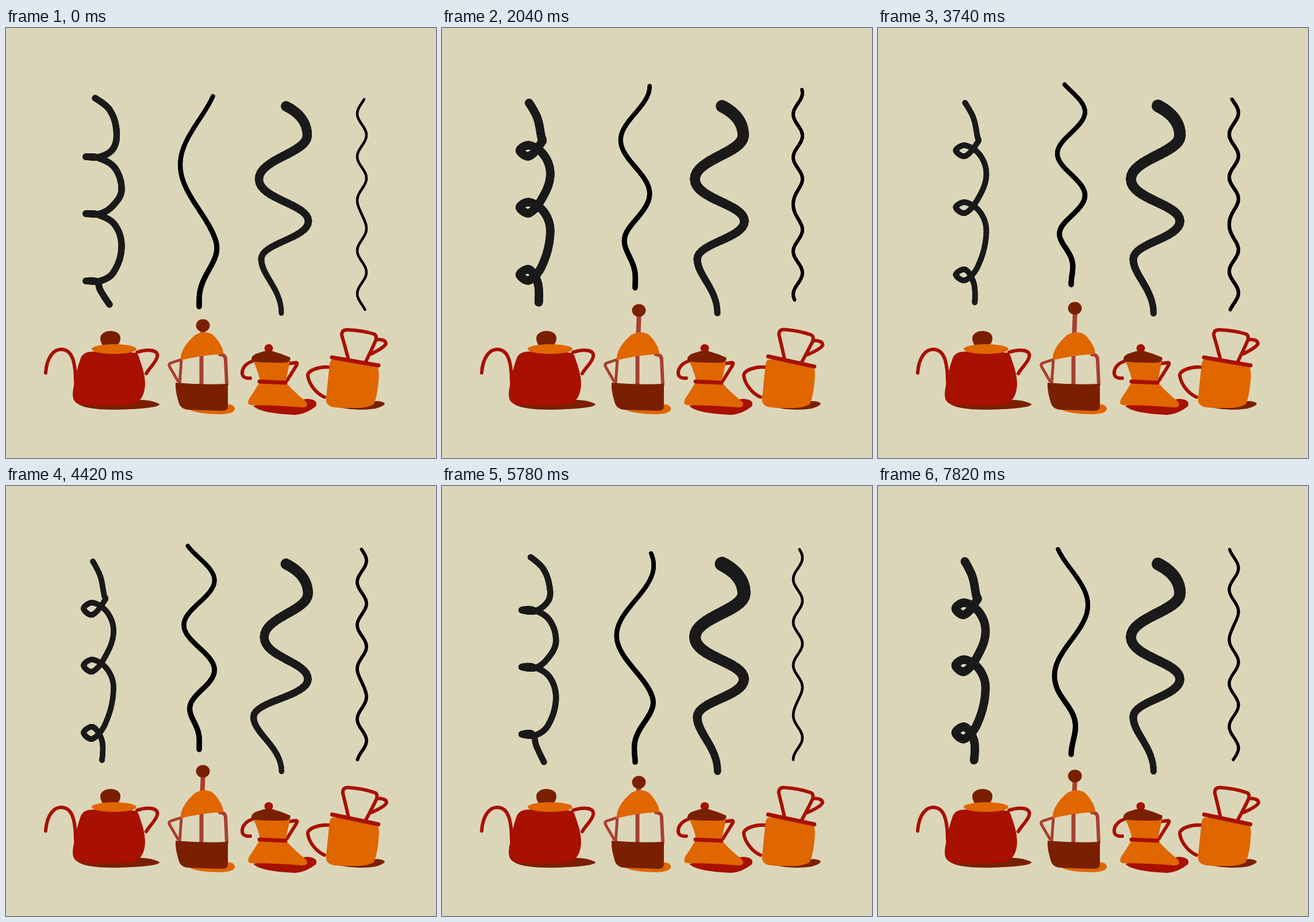
Recreate the animation shown at these times as an HTML page with a canvas. Size 748 px wide and 748 px high, loop 7990 ms.

```html
<!DOCTYPE html>
<html lang="en">
<head>
<meta charset="utf-8">
<title>Steam over coffee pots</title>
<style>
  html, body { margin: 0; width: 100%; height: 100%; overflow: hidden; background: #dcd6b9; }
  canvas { display: block; width: 100vmin; height: 100vmin; }
</style>
</head>
<body>
<canvas width="748" height="748"></canvas>
<script>
const ctx = document.querySelector('canvas').getContext('2d');
const STEP = 170, STEPS = 47;
const KEYS = [0, 7, 18, 26, 34, 40, 46];
const RED = '#a81000', BROWN = '#7a2000', ORANGE = '#e06600', RUST = '#a8402f', INK = '#1a1a1a';

const mix = (a, b, t) => a + (b - a) * t;
const ease = t => t * t * (3 - 2 * t);
const clamp = t => Math.min(1, Math.max(0, t));

// 0..1 and back; `linger` stays longer at both ends
const swing = (step, period, shift = 0) => (1 - Math.cos(2 * Math.PI * (step + shift) / period)) / 2;
const linger = (...args) => ease(ease(swing(...args)));

// Value between key steps
function track(step, values) {
  const next = KEYS.findIndex(key => key > step);
  const k = (next < 0 ? KEYS.length : next) - 1;
  if (k === KEYS.length - 1) return values[k];
  return mix(values[k], values[k + 1], (step - KEYS[k]) / (KEYS[k + 1] - KEYS[k]));
}

function fill(color, d) {
  ctx.fillStyle = color;
  ctx.fill(new Path2D(d));
}
function line(color, width, d) {
  ctx.strokeStyle = color;
  ctx.lineWidth = width;
  ctx.stroke(new Path2D(d));
}
function oval(color, x, y, rx, ry) {
  ctx.fillStyle = color;
  ctx.beginPath();
  ctx.ellipse(x, y, rx, ry, 0, 0, 7);
  ctx.fill();
}

function taper(points, color, from, to = from) {
  ctx.strokeStyle = color;
  for (let i = 1; i < points.length; i++) {
    ctx.lineWidth = mix(from, to, i / points.length);
    ctx.beginPath();
    ctx.moveTo(...points[i - 1]);
    ctx.lineTo(...points[i]);
    ctx.stroke();
  }
}

function bezier(...p) {
  return Array.from({ length: 17 }, (_, i) => {
    const t = i / 16, s = 1 - t;
    return [0, 1].map(k => s * s * s * p[0][k] + 3 * s * s * t * p[1][k] +
      3 * s * t * t * p[2][k] + t * t * t * p[3][k]);
  });
}

// Round curve through points; handles follow the distance to each neighbour
function smooth(points) {
  const gap = (a, b) => Math.hypot(b[0] - a[0], b[1] - a[1]);
  const slopes = points.map((p, i) => {
    const a = points[i - 1], b = points[i + 1];
    if (!a || !b) return [0, 0];
    const length = gap(a, p) + gap(p, b);
    return [(b[0] - a[0]) / length, (b[1] - a[1]) / length];
  });
  return points.slice(1).flatMap((b, i) => {
    const a = points[i], reach = 0.37 * gap(a, b);
    return bezier(a, a.map((v, k) => v + slopes[i][k] * reach),
      b.map((v, k) => v - slopes[i + 1][k] * reach), b);
  });
}

// Key points as x, y when closed to a loop, then x, y when open to a cusp
const CURL = {
  start: [[151, 131, 155, 122], [164, 157, 180, 142], [171, 191, 192, 177]],
  lead: [[16, -10, 19, 1], [42, 8, 50, 19], [52, 42, 62, 58]],
  tail: [[38, -16, 48, -15], [15, 11, 25, 0]],
  end: [[167, 443, 164, 456], [167, 477, 180, 481]]
};
function curlSteam(step) {
  const open = track(step, [1, 0, 0.2, 0, 0.8, 1, 0]);
  const morph = (list, x = 0, y = 0) =>
    list.map(([a, b, c, d]) => [x + mix(a, c, open), y + mix(b, d, open)]);
  const points = morph(CURL.start);
  const tipX = 135 + 4 * open;
  [213, 312, 429].forEach((y, i) => {
    const tipY = y + 11 * open ** 6;
    const lead = morph(CURL.lead, tipX, tipY);
    points.push(...morph(CURL.tail, tipX, tipY), [tipX, tipY], ...(i < 2 ? lead : lead.slice(0, 1)));
  });
  points.push(...morph(CURL.end));
  taper(smooth(points), INK, 9.5 + 5 * linger(step, 35, 8));
}

// Waves hang from a left crest and settle towards their foot
function middleSteam(step, lift) {
  const crest = track(step, [238, 195, 195, 242, 260, 400, 330]);
  const spacing = track(step, [157, 115, 67, 78, 122, 163, 123]);
  const top = mix(119, 96, lift), foot = mix(486, 443, lift);
  const points = [];
  for (let y = top; y <= foot; y += 3) {
    const reach = mix(33, 23, lift) * ease(clamp((foot - y) / 115));
    points.push([336 - reach * Math.cos(Math.PI * (y - crest) / spacing), y]);
  }
  taper(points, '#000', 7.5, 9.5);
}

function thinSteam(step, lift, sway) {
  const crest = track(step, [32, 32, 72, 64, 59, 69, 77]);
  const pause = track(step, [200, 200, 200, 234, 268, 200, 135]);
  const points = [];
  for (let y = 0; y <= 367; y += 3) {
    const phase = (y - 7 * Math.tanh((y - pause) / 22) - crest) / 37.4;
    points.push([619 - 8 * Math.cos(Math.PI * phase), y + mix(124, 107, sway)]);
  }
  taper(points, '#000', 4.4 + 2 * lift);
}

// Right and left bends sway at slightly different speeds
function heavySteam(step) {
  const right = linger(step, 12), left = linger(step, 11.4);
  const top = [487, 136 - 7 * right], foot = [479 + 5 * right, 496 + 6 * right];
  const bends = [
    { x: mix(524, 544, right), y: 187, reach: 30 },
    { x: mix(440, 453, left), y: 263, reach: 35 },
    { x: mix(526, 513, right), y: 336, reach: 30 },
    { x: mix(444, 425, left), y: 402, reach: 28 },
    { x: foot[0], y: foot[1], reach: 42 }
  ];
  const points = bezier(top, [top[0] + 24, top[1] + 12], [bends[0].x, 165], [bends[0].x, 187]);
  for (let i = 1; i < bends.length; i++) {
    const a = bends[i - 1], b = bends[i];
    points.push(...bezier([a.x, a.y], [a.x, a.y + a.reach], [b.x, b.y - b.reach], [b.x, b.y]));
  }
  const width = track(step, [18, 19, 25, 19, 25, 21, 22]);
  taper(points, INK, width, width / 2);
}

function kettle() {
  fill(BROWN, 'M121 650Q130 664 190 664Q268 662 267 654Q250 645 220 647Z');
  line(RED, 6, 'M69 600C71 571 84 559 96 559C113 559 121 576 121 616');
  line(RED, 6, 'M228 564C250 557 266 561 263 572C261 582 250 590 244 601');
  fill(RED, 'M150 563Q180 560 225 565Q230 566 232 575C238 592 242 605 242 620C241 641 232 655 214 655C190 657 150 657 131 655C116 653 114 642 118 622C121 604 125 588 130 574Q135 563 150 563Z');
  fill(BROWN, 'M168 552Q162 542 165 535Q171 526 184 527Q199 529 199 540Q199 547 193 553Z');
  oval(ORANGE, 188, 558.5, 39, 8.5);
}

function press(knobY) {
  fill(ORANGE, 'M315 661Q325 671 372 672Q400 671 398 661Q395 653 380 655Z');
  line(RUST, 8, `M343 ${knobY}L341 545`);
  line(RUST, 7, 'M340 570V620');
  line(RUST, 6, 'M372 568Q382 568 382 577L384 620');
  line(RUST, 5, 'M305 577L302 620M304 577L286 583Q282 585 285 590L299 614');
  fill(ORANGE, 'M304 578C303 562 314 547 329 534Q345 525 359 533C369 542 378 556 378 567Q340 569 304 578Z');
  fill(BROWN, 'M295 617Q340 621 386 619L386 658Q386 666 376 666L317 664Q303 663 300 650Q294 630 295 617Z');
  oval(BROWN, 342.5, knobY, 12, 11);
}

function moka() {
  fill(RED, 'M430 657Q440 670 502 673Q522 672 539 658Q544 647 525 645Z');
  line(RED, 6, 'M428 580C415 584 408 596 412 605Q416 610 425 609');
  line(RED, 6, 'M489 584L505 582Q508 583 504 589L489 613');
  fill(ORANGE, 'M430 579L494 579Q490 600 486 615L442 613Q438 596 430 579Z');
  fill(ORANGE, 'M440 618L489 619Q500 632 522 650Q528 660 515 660Q470 656 425 656Q418 654 424 643Q432 632 440 618Z');
  line(RED, 7, 'M441 615L486 617');
  oval(RED, 457, 557, 7.5, 7);
  fill(BROWN, 'M427 580Q425 572 434 567Q450 561 460 561Q478 566 494 573Q497 579 488 582Q455 583 427 580Z');
}

function mug(sway) {
  fill(BROWN, 'M575 659Q610 667 643 662Q662 656 658 652Q650 647 635 650Z');
  line(RED, 6, 'M562 590C545 588 524 596 525 605C527 620 540 636 554 642');
  fill(ORANGE, 'M567 577Q590 575 610 583Q635 586 647 590Q650 600 648 615Q646 640 640 654Q630 662 600 661Q575 661 567 659Q555 655 557 643Q560 610 563 585Q564 578 567 577Z');
  ctx.save();
  ctx.translate(607, 580);
  ctx.rotate(sway * 0.045);
  ctx.translate(-607, -580);
  line(RED, 7, 'M567 573L648 587');
  line(RED, 6, 'M595 574Q590 555 584 534Q584 525 593 525Q620 526 639 532Q646 534 643 544Q635 562 626 580');
  line(RED, 6, 'M645 542Q660 541 661 549Q658 556 635 567');
  ctx.restore();
}

function drawFrame(step) {
  const lift = swing(step, 39, 1.5), sway = linger(step, 20);
  ctx.fillStyle = '#dcd6b9';
  ctx.fillRect(0, 0, 748, 748);
  ctx.lineCap = ctx.lineJoin = 'round';
  curlSteam(step);
  middleSteam(step, lift);
  heavySteam(step);
  thinSteam(step, lift, sway);
  kettle();
  press(mix(518, 484, lift));
  moka();
  mug(sway);
}

function tick() {
  drawFrame(Math.floor(performance.now() / STEP) % STEPS);
  requestAnimationFrame(tick);
}
tick();
</script>
</body>
</html>
```
